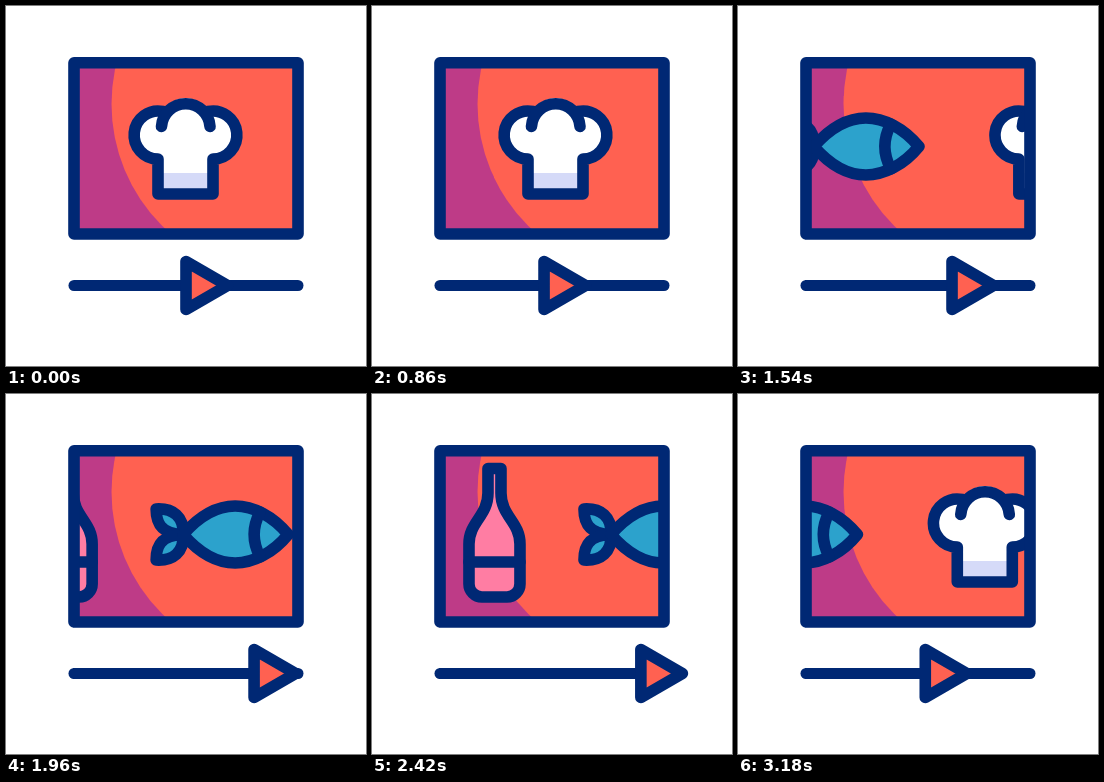
Write an HTML page that moves like this. It is 360 px wide and 360 px high and loops after 3.2 s.

```html
<!DOCTYPE html>
<html lang="en">
<head>
<meta charset="utf-8">
<title>Cooking video</title>
<style>
html, body { margin: 0; width: 100%; height: 100%; overflow: hidden; background: #fff; }
svg { display: block; width: 100vw; height: 100vh; }
.ink { stroke: #002874; stroke-width: 11.6; stroke-linecap: round; stroke-linejoin: round; }
</style>
</head>
<body>
<svg viewBox="0 0 360 360">
  <defs>
    <clipPath id="screen"><path d="M68 57H292V228H68Z"/></clipPath>
    <path id="fin" d="M178 140.5C154 140 151 127 151 115C168 114 179 123 178 140.5Z"/>
  </defs>
  <g clip-path="url(#screen)">
    <path fill="#be3b87" d="M68 57H292V228H68Z"/>
    <circle cx="277.5" cy="98" r="172" fill="#ff6151"/>
    <g id="strip" class="ink" fill="none">
      <g id="hat">
        <path fill="#fff" stroke="none" d="M152 188V153A24 24 0 1 1 157 106A25 25 0 0 1 202 106A24 24 0 1 1 207 153V188Z"/>
        <path fill="#d5daf8" stroke="none" d="M152 167H207V188H152Z"/>
        <path d="M157 105.5A24 24 0 1 0 152 153V188H207V153A24 24 0 1 0 202 105.5"/>
        <path d="M155.500 120.500A24.300 24.300 0 0 1 204 120.500"/>
      </g>
      <g id="fish" fill="#2ca2cc" transform="translate(-231)">
        <use href="#fin"/>
        <use href="#fin" transform="matrix(1 0 0 -1 0 281)"/>
        <path d="M178 140.500C195 121 212 112 230 112C248 112 268 122 283 140.500C268 159 248 169 230 169C212 169 195 160 178 140.500Z"/>
        <path fill="none" d="M255 118Q243 140.500 255 163"/>
      </g>
      <g id="bottle" fill="#ff7da3" transform="translate(-292)">
        <path d="M116 74.500H129V99C129 122 148 128 148 150V190A13 13 0 0 1 135 203H110A13 13 0 0 1 97 190V150C97 128 116 122 116 99Z"/>
        <path d="M97 168H148"/>
      </g>
    </g>
  </g>
  <g class="ink" fill="none">
    <path d="M68 56.800H292V228H68Z"/>
    <path stroke-width="11" d="M68 279.500H292"/>
    <path id="play" fill="#ff6151" d="M180 255.500V303.500L221.500 279.500Z"/>
  </g>
</svg>
<script>
const LOOP = 3200, HOLD = 220, CYCLE = 3000, STEP = 20;
const RISE = 740, TURN = 2480, REST = RISE + CYCLE;
const strip = document.getElementById('strip');
const play = document.getElementById('play');

// Cubic easing with control points (x1, 0) and (x2, 1)
function ease(u, x1, x2) {
  let lo = 0, hi = 1, s = 0.5;
  for (let i = 0; i < 24; i++) {
    s = (lo + hi) / 2;
    const r = 1 - s;
    if (3 * r * r * s * x1 + 3 * r * s * s * x2 + s ** 3 < u) lo = s;
    else hi = s;
  }
  return s * s * (3 - 2 * s);
}

function swing(t, x1, x2) {
  if (t < RISE) t += CYCLE;
  return t < TURN
    ? ease((t - RISE) / (TURN - RISE), 1 / 3, 2 / 3)
    : 1 - ease((t - TURN) / (REST - TURN), x1, x2);
}

function move(el, x) {
  el.setAttribute('transform', `translate(${x.toFixed(2)})`);
}

function draw(now) {
  const t = Math.floor(now % LOOP / STEP) * STEP;
  const still = t < HOLD;
  move(strip, still ? 0 : 293 * swing(t, 0.752, 0.176));
  move(play, still ? 0 : -9.3 + 98.5 * swing(t, 0.624, 0.134));
}

let start;
function tick(now) {
  start ??= now;
  draw(now - start);
  requestAnimationFrame(tick);
}
draw(0);
requestAnimationFrame(tick);
</script>
</body>
</html>
```
